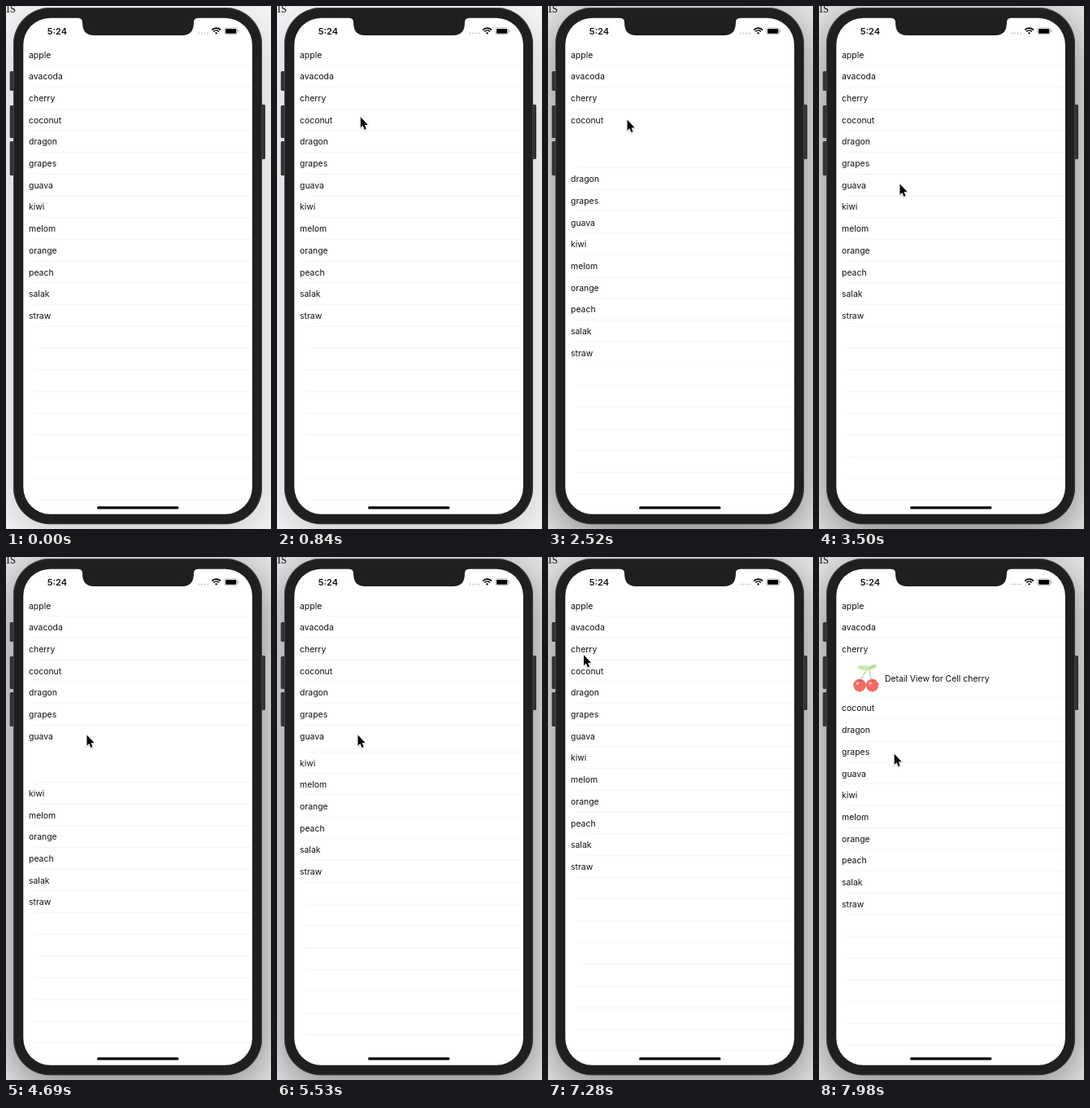
Write an HTML page with a canvas that moves like this. It is 326x642 px and loops after 8000 ms.

```html
<!DOCTYPE html>
<html lang="en">
<head>
<meta charset="utf-8">
<title>Expandable fruit list</title>
<style>
html, body { margin: 0; width: 326px; height: 642px; overflow: hidden; background: #fff; }
canvas { display: block; }
</style>
</head>
<body>
<canvas id="stage" width="326" height="642"></canvas>
<script>
const ctx = document.getElementById('stage').getContext('2d');
const LOOP = 8000;
const PITCH = 26.7;
const DETAIL = 45.8;
const SCREEN = [21.3, 14.7, 281.6, 609, 33];
const FONT = 'Inter, "Open Sans", sans-serif';
const fruits = ['apple', 'avacoda', 'cherry', 'coconut', 'dragon', 'grapes', 'guava',
  'kiwi', 'melom', 'orange', 'peach', 'salak', 'straw'];

// Each toggle opens one row, then closes it.
const toggles = [
  { row: 3, open: 1292, close: 2515 },
  { row: 6, open: 3495, close: 4643 },
  { row: 6, open: 5450, close: 6435 },
  { row: 2, open: 7615, close: 9000 }
];
const presses = [[1120, 1330], [2310, 2520], [3290, 3500], [4410, 4690],
  [5250, 5460], [6230, 6440], [7420, 7630]];
// Pointer moves: start, end, target x, target y
const moves = [
  [350, 980, 97.5, 139.7],
  [3010, 3260, 99.5, 218.6],
  [5860, 6200, 106.8, 247.2],
  [6660, 7280, 44, 120.2],
  [7680, 7980, 92.7, 241.8]
];

const ease = (t, start, length) => {
  const p = Math.min(1, Math.max(0, (t - start) / length));
  return p * p * (3 - 2 * p);
};

function box(x, y, w, h, r, color) {
  ctx.fillStyle = color;
  ctx.beginPath();
  ctx.roundRect(x, y, w, h, r);
  ctx.fill();
}

function disc(x, y, r, color) {
  ctx.fillStyle = color;
  ctx.beginPath();
  ctx.arc(x, y, r, 0, Math.PI * 2);
  ctx.fill();
}

function oval(x, y, rx, ry, turn, color) {
  ctx.fillStyle = color;
  ctx.beginPath();
  ctx.ellipse(x, y, rx, ry, turn, 0, Math.PI * 2);
  ctx.fill();
}

function label(text, x, y, size = 10.45, weight = 400) {
  ctx.font = `${weight} ${size}px ${FONT}`;
  ctx.fillStyle = '#111';
  ctx.fillText(text, x, y);
}

function drawBody(t) {
  const focus = ease(t, 1090, 170);
  ctx.fillStyle = '#fff';
  ctx.fillRect(0, 0, 326, 642);
  ctx.font = '18px "Liberation Serif", serif';
  ctx.fillStyle = '#333';
  ctx.fillText('is', 0, 8);

  // The window shadow deepens when the window takes focus.
  ctx.fillStyle = `rgba(0,0,0,${0.04 + 0.06 * focus})`;
  ctx.fillRect(0, 0, 326, 642);
  ctx.save();
  ctx.shadowColor = `rgba(0,0,0,${0.17 + 0.25 * focus})`;
  ctx.shadowBlur = 50;
  ctx.shadowOffsetY = 12;
  box(9, 2, 306, 634, 45, '#444');
  ctx.restore();

  [[4.7, 80, 24], [4.7, 122, 40], [4.7, 166, 42], [313.5, 121, 67]].forEach(([x, y, h]) =>
    box(x, y, 5.5, h, 1.5, '#333'));
  box(9, 2, 306, 634.3, 45, '#404040');
  box(10, 3, 304, 632.3, 44, '#1e1f1f');
  box(...SCREEN, '#fff');
}

function drawNotch() {
  ctx.fillStyle = '#1e1f1f';
  ctx.beginPath();
  ctx.moveTo(89, 14);
  ctx.lineTo(236, 14);
  ctx.lineTo(236, 14.7);
  ctx.quadraticCurveTo(231, 15, 231, 20);
  ctx.bezierCurveTo(231, 31, 226, 36, 217, 36);
  ctx.lineTo(108, 36);
  ctx.bezierCurveTo(99, 36, 94, 31, 94, 20);
  ctx.quadraticCurveTo(94, 15, 89, 14.7);
  ctx.fill();
}

function drawStatus() {
  label('5:24', 50.8, 34.8, 11, 600);
  for (let i = 0; i < 4; i++) disc(237.3 + i * 3.6, 33.6, 1, '#c4c4c4');

  ctx.strokeStyle = '#000';
  ctx.lineWidth = 1.7;
  [7.4, 4.6].forEach(r => {
    ctx.beginPath();
    ctx.arc(258.6, 34.6, r, -Math.PI * 0.76, -Math.PI * 0.24);
    ctx.stroke();
  });
  ctx.fillStyle = '#000';
  ctx.beginPath();
  ctx.moveTo(258.6, 34.8);
  ctx.arc(258.6, 34.6, 2.3, -Math.PI * 0.76, -Math.PI * 0.24);
  ctx.fill();

  ctx.strokeStyle = '#aaa';
  ctx.lineWidth = 0.8;
  ctx.beginPath();
  ctx.roundRect(268.6, 26.8, 16, 8, 2.3);
  ctx.stroke();
  box(270, 28, 13.3, 5.7, 1.2, '#000');
  box(285.4, 29.3, 1.1, 3, 0.6, '#aaa');
}

const icons = {
  cherry(x, y) {
    ctx.strokeStyle = '#b9d59c';
    ctx.lineWidth = 1.3;
    ctx.beginPath();
    ctx.moveTo(x - 7, y + 4);
    ctx.quadraticCurveTo(x - 3, y - 6, x + 4, y - 13);
    ctx.quadraticCurveTo(x + 5, y - 3, x + 8, y + 3);
    ctx.stroke();
    oval(x - 2, y - 13, 8.5, 3, 0.12, '#c9eab0');
    oval(x + 8, y - 14, 5.5, 2.5, -0.35, '#b8e098');
    [-7.5, 8].forEach(dx => {
      disc(x + dx, y + 8.5, 7.8, '#f06c64');
      oval(x + dx - 2.5, y + 6, 2.3, 1.6, -0.5, '#fbb8ae');
      oval(x + dx + 1, y + 2.8, 2.5, 0.9, 0, '#c8605a');
    });
  },
  coconut(x, y) {
    disc(x - 3, y - 1, 13, '#805a40');
    oval(x + 4, y + 4, 11.5, 10.5, 0.3, '#66452f');
    oval(x + 4, y + 4, 9.5, 8.5, 0.3, '#fbfaf4');
    oval(x + 4, y + 4, 6, 5, 0.3, '#e7e4da');
  },
  guava(x, y) {
    oval(x - 3, y - 1, 12, 13.5, 0.2, '#a5c75e');
    oval(x + 4, y + 3, 11, 11, 0, '#c3da82');
    disc(x + 4, y + 3, 9, '#f3a09a');
    disc(x + 4, y + 3, 5, '#ec827f');
  }
};

function drawDetail(row, shift, alpha) {
  const y = 59.7 + PITCH * row + 36.5;
  ctx.save();
  ctx.beginPath();
  ctx.rect(22, y - 24, 281, shift);
  ctx.clip();
  ctx.globalAlpha = alpha;
  icons[fruits[row]](57.5, y - 0.5);
  label(`Detail View for Cell ${fruits[row]}`, 80.9, y + 3.7);
  ctx.restore();
}

function drawList(t) {
  const active = toggles.find(k => t >= k.open && t < k.close + 350);
  const shown = active ? ease(t, active.open, 350) : 0;
  const shift = active ? DETAIL * (shown - ease(t, active.close, 350)) : 0;

  ctx.save();
  ctx.beginPath();
  ctx.roundRect(...SCREEN);
  ctx.clip();
  for (let i = 0; i < 21; i++) {
    const lineY = 72.78 + PITCH * i + (active && i >= active.row ? shift : 0);
    ctx.fillStyle = '#ebebeb';
    if (lineY < 612) ctx.fillRect(35, lineY - 0.3, 268, 0.6);
    if (i < fruits.length) {
      label(fruits[i], 28, 63.55 + PITCH * i + (active && i > active.row ? shift : 0));
    }
  }
  // The detail vanishes at once when its row starts to close.
  if (active && t < active.close) drawDetail(active.row, shift, shown);
  ctx.restore();
}

function drawPointer(t) {
  if (t < 350) return;
  let x = 140, y = 113;
  for (const [start, end, toX, toY] of moves) {
    const p = ease(t, start, end - start);
    x += (toX - x) * p;
    y += (toY - y) * p;
  }

  if (presses.some(([down, up]) => t >= down && t < up)) {
    ctx.strokeStyle = 'rgba(40,40,40,0.75)';
    ctx.lineWidth = 1.6;
    ctx.beginPath();
    ctx.arc(x - 0.5, y, 21.8, 0, Math.PI * 2);
    ctx.stroke();
  }

  ctx.save();
  ctx.translate(x, y);
  ctx.shadowColor = 'rgba(0,0,0,0.25)';
  ctx.shadowBlur = 2;
  ctx.shadowOffsetY = 1;
  ctx.beginPath();
  [[0, 0], [0, 13], [2.9, 10.4], [4.9, 15.3], [7, 14.4], [5, 9.7], [9, 9.5]].forEach(p => ctx.lineTo(...p));
  ctx.closePath();
  ctx.strokeStyle = '#fff';
  ctx.lineWidth = 1.4;
  ctx.lineJoin = 'round';
  ctx.stroke();
  ctx.shadowColor = 'transparent';
  ctx.fillStyle = '#000';
  ctx.fill();
  ctx.restore();
}

const begin = performance.now();
function draw() {
  const t = (performance.now() - begin) % LOOP;
  drawBody(t);
  drawList(t);
  drawNotch();
  drawStatus();
  box(112, 614.3, 100.5, 3.2, 1.6, '#000');
  drawPointer(t);
  requestAnimationFrame(draw);
}
draw();
</script>
</body>
</html>
```
